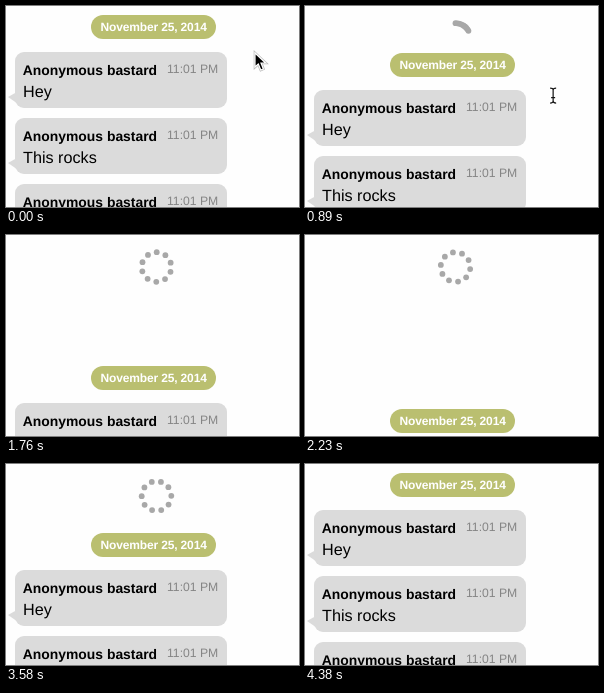
These frames come from a looping animation (293x201 px, 5090 ms). An HTML page:

```html
<!DOCTYPE html>
<html lang="en">
<head>
<meta charset="utf-8">
<title>Pull to refresh</title>
<style>
  html, body { margin: 0; width: 100%; height: 100%; overflow: hidden; background: #fefefe; }
  svg { display: block; font-family: "Liberation Sans", Arial, sans-serif; text-rendering: geometricPrecision; }
  .name { font-weight: bold; font-size: 13.9px; }
  .time { font-size: 12.2px; fill: #858585; }
  .message { font-size: 16.2px; }
  .date { font-weight: bold; font-size: 12px; letter-spacing: -.15px; fill: #fff; text-anchor: middle; }
</style>
</head>
<body>
<svg width="293" height="201" viewBox="0 0 293 201">
  <g id="spinner" fill="#a8a8a8"></g>
  <g id="content">
    <rect x="85" y="9" width="125" height="24" rx="12" fill="#babf70"/>
    <text class="date" x="147.6" y="25">November 25, 2014</text>
  </g>
  <g id="arrow">
    <path d="M0 0V14L3.3 11L5.8 17L8.4 15.9L6 10H10.6Z" fill="none" stroke="#bbb" stroke-width="2.6"/>
    <path d="M0 0V14L3.3 11L5.8 17L8.4 15.9L6 10H10.6Z" stroke="#fff" stroke-width="1.2"/>
  </g>
  <path id="beam" d="M-3 -7.5Q0 -7.5 0 -5.5Q0 -7.5 3 -7.5M0 -6V6M-3 7.5Q0 7.5 0 5.5Q0 7.5 3 7.5M-2 2H2" fill="none" stroke="#111" stroke-width="1.2"/>
</svg>
<script>
const LOOP = 5090;
const PULL_START = 600, RELEASE = 2375, RETURN = 3880, SETTLE = 500;
const REST = 60, DOTS = 10, SPIN_START = 1757, SPIN_PERIOD = 1740;
const CENTER_X = 150.5, CENTER_Y = 32, RADIUS = 14.8;

const $ = id => document.getElementById(id);
const clamp = v => Math.min(1, Math.max(0, v));
const mix = (a, b, u) => a + (b - a) * u;

function add(parent, tag, attrs, text = "") {
  const el = document.createElementNS("http://www.w3.org/2000/svg", tag);
  for (const key in attrs) el.setAttribute(key, attrs[key]);
  el.textContent = text;
  return parent.appendChild(el);
}

["Hey", "This rocks", ""].forEach((message, i) => {
  const g = add($("content"), "g", { transform: `translate(0 ${46 + 66 * i})` });
  add(g, "path", { d: "M2 45L10 40.5V50.5Z", fill: "#dbdbdb" });
  add(g, "rect", { x: 9, width: 212, height: 56, rx: 9, fill: "#dbdbdb" });
  add(g, "text", { class: "name", x: 16.8, y: 23 }, "Anonymous bastard");
  add(g, "text", { class: "time", x: 161, y: 21 }, "11:01 PM");
  add(g, "text", { class: "message", x: 17, y: 45 }, message);
});

const dots = Array.from({ length: DOTS }, () => add($("spinner"), "circle", { r: 2.9 }));

// Cubic Bezier (.25, .1, .25, 1), solved for x by bisection.
function ease(x) {
  const curve = (s, a, b) => 3 * s * (1 - s) ** 2 * a + 3 * s * s * (1 - s) * b + s ** 3;
  let low = 0, high = 1;
  for (let i = 0; i < 20; i++) {
    const mid = (low + high) / 2;
    if (curve(mid, .25, .25) < x) low = mid; else high = mid;
  }
  return curve(low, .1, 1);
}

// The content follows the pointer at first, then resists.
function pulled(t) {
  const since = Math.max(0, t - PULL_START);
  return Math.min(since * .146, 9 + since * .1016 - since ** 2 * 3.7e-6);
}

function offsetAt(t) {
  if (t < RELEASE) return pulled(t);
  if (t < RETURN) return mix(pulled(RELEASE), REST, ease(clamp((t - RELEASE) / SETTLE)));
  return mix(REST, 0, ease(clamp((t - RETURN) / SETTLE)));
}

function drawSpinner(t, offset) {
  const spread = t < RELEASE ? clamp((offset - 20) / 97) : 1;
  const spin = Math.max(0, t - SPIN_START) / SPIN_PERIOD;
  const opacity = t < RELEASE ? +(offset > 20) : 1 - clamp((t - RETURN) / 250);
  $("spinner").setAttribute("opacity", opacity);
  dots.forEach((dot, i) => {
    const angle = 2 * Math.PI * (spread * i / DOTS + spin);
    dot.setAttribute("cx", CENTER_X + RADIUS * Math.sin(angle));
    dot.setAttribute("cy", CENTER_Y - RADIUS * Math.cos(angle));
  });
}

function drawCursor(t) {
  const since = Math.max(0, t - PULL_START);
  const x = 249 - 3.5 * clamp((since - 140) / 610), y = 47 + since * .1462;
  const place = `translate(${x} ${y})`;
  $("arrow").setAttribute("transform", place);
  $("beam").setAttribute("transform", place);
  $("arrow").setAttribute("visibility", t < 660 ? "visible" : "hidden");
  $("beam").setAttribute("visibility", t >= 660 && t < 1630 ? "visible" : "hidden");
}

function render(t) {
  const offset = offsetAt(t);
  $("content").setAttribute("transform", `translate(0 ${Math.round(offset)})`);
  drawSpinner(t, offset);
  drawCursor(t);
}

const start = performance.now();
function frame() {
  render((performance.now() - start) % LOOP);
  requestAnimationFrame(frame);
}
frame();
</script>
</body>
</html>
```
